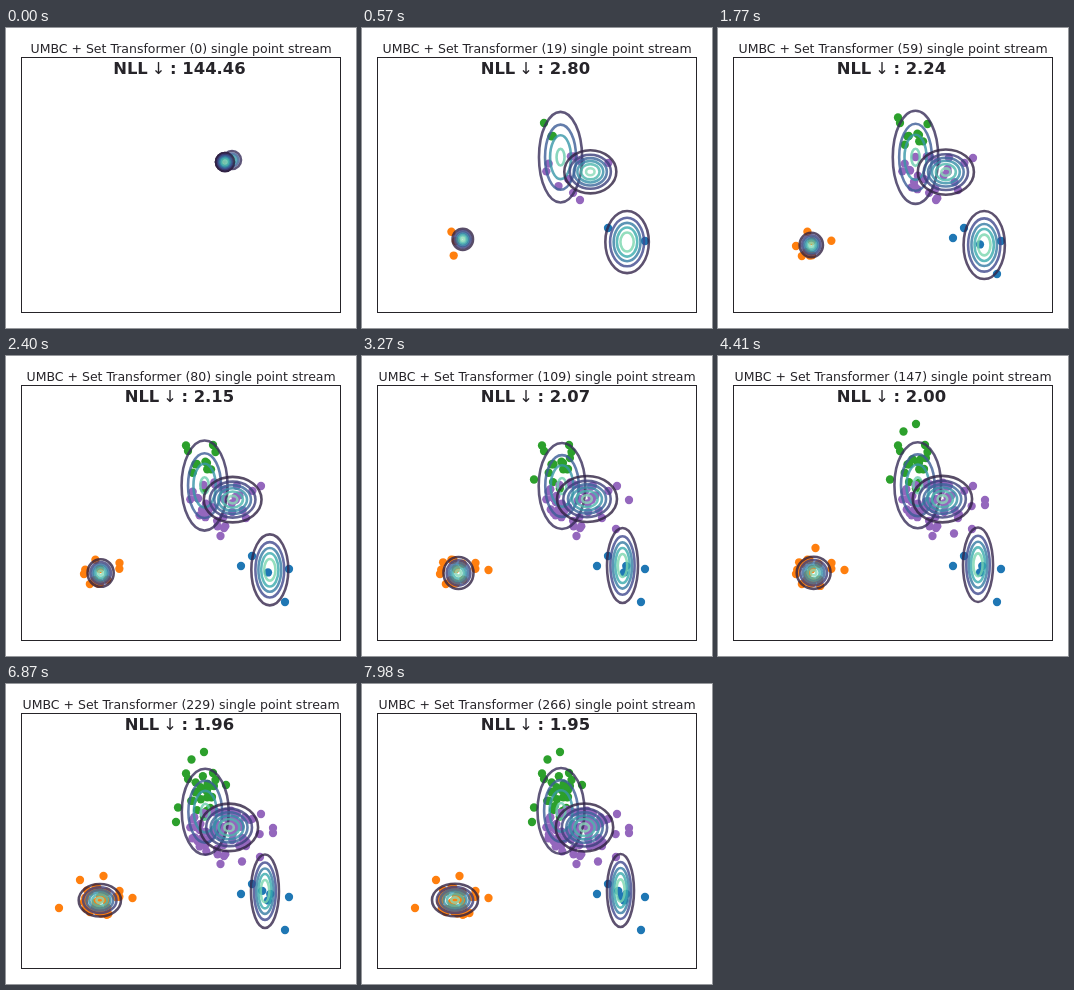
Recreate the animation shown at these times as an HTML page with a canvas. Size 350 by 300 pixels, loop 8000 ms.

```html
<!DOCTYPE html>
<html lang="en">
<head>
<meta charset="utf-8">
<title>Clustering a point stream</title>
<style>
  html, body { margin: 0; width: 100%; height: 100%; overflow: hidden; background: #fff; }
  canvas { display: block; width: 350px; height: 300px; }
</style>
</head>
<body>
<canvas id="stage" width="350" height="300"></canvas>
<script>
const ctx = document.getElementById('stage').getContext('2d');
const LOOP = 8000, STEP = 30, LAST = 266;
const INK = '#262429';
const KEY_STEPS = [0, 39, 109, LAST];

// start: common birthplace of the ellipse; fits: x, y, rx, ry at the later key steps
// peak: density maximum in contour levels
// cloud: x, y, rx, ry of the area filled with random dots; share: how fast it fills
// outliers: dots outside the cloud, one arriving every `gap` steps
const CLUSTERS = [
  {
    color: '#1f77b4', peak: 5.9, share: 0.05, gap: 9,
    start: [219, 134],
    fits: [[268.5, 220, 22.7, 32.7], [260.5, 209.5, 15.5, 37.5], [258.5, 206.5, 13.5, 36.5]],
    cloud: [261, 219, 9, 18],
    outliers: [[246, 200], [283, 213], [235, 210], [279, 246]]
  },
  {
    color: '#ff7f0e', peak: 6.3, share: 0.3, gap: 36,
    start: [219, 134],
    fits: [[92, 217, 10.3, 10.7], [96.5, 217, 15, 16], [93, 216, 23, 16.3]],
    cloud: [95, 217, 20, 16],
    outliers: [[78, 218], [113.5, 207], [126.5, 214], [97.5, 192], [74, 196], [53, 224]]
  },
  {
    color: '#2ca02c', peak: 4.2, share: 0.27, gap: 18,
    start: [226, 132],
    fits: [[196.5, 129, 22.5, 48], [200, 130, 23.3, 43], [199, 127, 23.5, 43]],
    cloud: [195, 111, 15, 23],
    outliers: [[182, 95], [209.5, 96], [180, 89.5], [207, 89], [172, 123.5], [206, 113],
      [185.5, 75.5], [198, 68], [170, 138], [220, 101]]
  },
  {
    color: '#9467bd', peak: 6.3, share: 0.85, gap: 18,
    start: [219, 134],
    fits: [[229, 144.5, 27.3, 22.5], [225, 143, 30, 23], [222.5, 143.5, 28.7, 24]],
    cloud: [218, 147, 37, 25],
    outliers: [[218, 172], [255, 130], [240, 162], [214.5, 180], [254, 173], [267, 144],
      [236, 177.5], [267, 149]]
  }
];

const RAMP = ['0b0405', '35264c', '40498e', '357ba3', '38aaac', '79d6ae', 'def5e5']
  .map(hex => [0, 2, 4].map(i => parseInt(hex.slice(i, i + 2), 16)));

const lerp = (a, b, u) => a + (b - a) * u;

function seeded(seed) {
  return () => {
    seed = (seed * 16807) % 2147483647;
    return seed / 2147483647;
  };
}

// Dots that have arrived inside a cloud grow in number ever more slowly.
const arrived = (share, step) => Math.floor(share * step ** 0.8);

function fillCloud({ cloud: [x, y, rx, ry], share }, index) {
  const random = seeded(4127 * (index + 1));
  return Array.from({ length: arrived(share, LAST) }, () => {
    const r = Math.sqrt(random()), a = 2 * Math.PI * random();
    return [x + rx * r * Math.cos(a), y + ry * r * Math.sin(a)];
  });
}

CLUSTERS.forEach((c, i) => {
  c.dots = fillCloud(c, i);
  c.fits.unshift([...c.start, 9, 9]);
});

function rampColor(v) {
  const pos = v * (RAMP.length - 1);
  const i = Math.min(Math.floor(pos), RAMP.length - 2);
  const rgb = RAMP[i].map((c, j) => Math.round(lerp(c, RAMP[i + 1][j], pos - i)));
  return `rgba(${rgb.join(',')},0.8)`;
}

function dot([x, y], color) {
  ctx.fillStyle = color;
  ctx.beginPath();
  ctx.arc(x, y, 4.15, 0, 2 * Math.PI);
  ctx.fill();
}

function drawDots({ dots, outliers, share, gap, color }, step) {
  const inside = dots.slice(0, arrived(share, step));
  const outside = outliers.slice(0, Math.floor(step / gap));
  [...inside, ...outside].forEach(p => dot(p, color));
}

function fitAt({ fits }, step) {
  let i = 0;
  while (i < KEY_STEPS.length - 2 && step >= KEY_STEPS[i + 1]) i++;
  const u = (step - KEY_STEPS[i]) / (KEY_STEPS[i + 1] - KEY_STEPS[i]);
  const eased = i === 0 ? 1 - (1 - u) ** 4 : u;
  return fits[i].map((v, j) => lerp(v, fits[i + 1][j], eased));
}

// Contours of a Gaussian at evenly spaced density levels.
function drawRings([x, y, rx, ry], peak) {
  const count = Math.floor(peak);
  ctx.lineWidth = 2.6;
  for (let i = 1; i <= count; i++) {
    const r = Math.sqrt(Math.log(peak / i) / Math.log(peak));
    ctx.strokeStyle = rampColor(i / (count + 1));
    ctx.beginPath();
    ctx.ellipse(x, y, rx * r, ry * r, 0, 0, 2 * Math.PI);
    ctx.stroke();
  }
}

// The score drops at once, then settles slowly.
const scoreAt = step => 1.94 + 0.85 * Math.exp(-step / 57) + 141.67 * Math.exp(-step / 3);

function text(str, x, y, font, align) {
  ctx.font = font + ' "DejaVu Sans", sans-serif';
  ctx.textAlign = align;
  ctx.fillText(str, x, y);
}

function drawLabels(step) {
  ctx.fillStyle = INK;
  text(`UMBC + Set Transformer (${step}) single point stream`, 175.1, 24.8, '12.5px', 'center');
  const value = scoreAt(step).toFixed(2);
  const half = 66.2 - (6 - value.length) * 5.75;
  const mid = 173.4;
  text('NLL', mid - half, 46.3, 'bold 16.4px', 'left');
  text('↓', mid - half + 45.4, 46.3, '16.4px', 'center');
  text(': ' + value, mid + half, 46.3, 'bold 16.4px', 'right');
}

function draw(step) {
  ctx.fillStyle = '#fff';
  ctx.fillRect(0, 0, 350, 300);
  dot([219, 133.5], '#9467bd');
  CLUSTERS.forEach(c => drawDots(c, step));
  CLUSTERS.forEach(c => drawRings(fitAt(c, step), c.peak));
  ctx.strokeStyle = INK;
  ctx.lineWidth = 1;
  ctx.strokeRect(15.5, 29.5, 319, 255);
  drawLabels(step);
}

function tick() {
  draw(Math.min(LAST, Math.floor((performance.now() % LOOP) / STEP)));
  requestAnimationFrame(tick);
}
tick();
</script>
</body>
</html>
```
